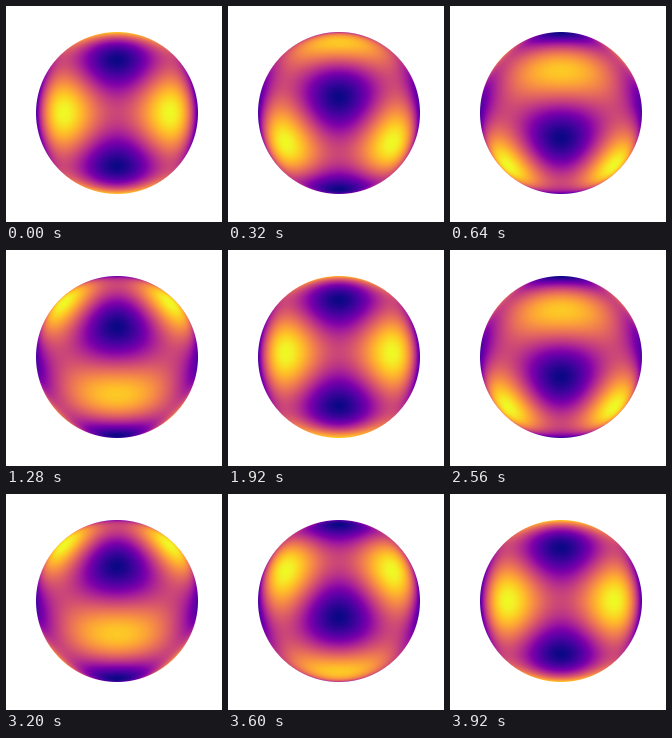
Write a matplotlib script that moves like this. It is 216 px wide and 216 px high and loops after 4000 ms.

```python
import numpy as np
import matplotlib.pyplot as plt
from matplotlib.animation import FuncAnimation

SIZE = 216
FRAMES = 50
INTERVAL = 80
CENTER_X, CENTER_Y, RADIUS = 111, 107, 81
PEAK = 9 / 7  # largest value of the harmonic below

# Unit sphere seen straight on: x right, y down, z towards the viewer
rows, cols = np.mgrid[:SIZE, :SIZE] + 0.5
x = (cols - CENTER_X) / RADIUS
y = (rows - CENTER_Y) / RADIUS
dist = np.hypot(x, y)
z = np.sqrt(np.clip(1 - dist**2, 0, None))
coverage = np.clip(RADIUS * (1 - dist) + 0.5, 0, 1)  # smooth rim


def harmonic(angle):
    """Real spherical harmonic l=4, m=2, turned about the horizontal axis."""
    c, s = np.cos(angle), np.sin(angle)
    y0 = y * c - z * s
    z0 = z * c + y * s
    return (x**2 - y0**2) * (7 * z0**2 - 1)


def sphere(angle):
    rgba = plt.cm.plasma((harmonic(angle) / PEAK + 1) / 2)
    rgba[..., 3] = coverage
    return rgba


fig = plt.figure(figsize=(SIZE / 100, SIZE / 100), dpi=100, facecolor="white")
ax = fig.add_axes([0, 0, 1, 1])
ax.axis("off")
image = ax.imshow(sphere(0), interpolation="nearest", aspect="auto")


def update(frame):
    # The last frame completes the turn, so it equals the first
    image.set_data(sphere(2 * np.pi * frame / (FRAMES - 1)))
    return (image,)


anim = FuncAnimation(fig, update, frames=FRAMES, interval=INTERVAL,
                     repeat=True, repeat_delay=0)
plt.show()
```
